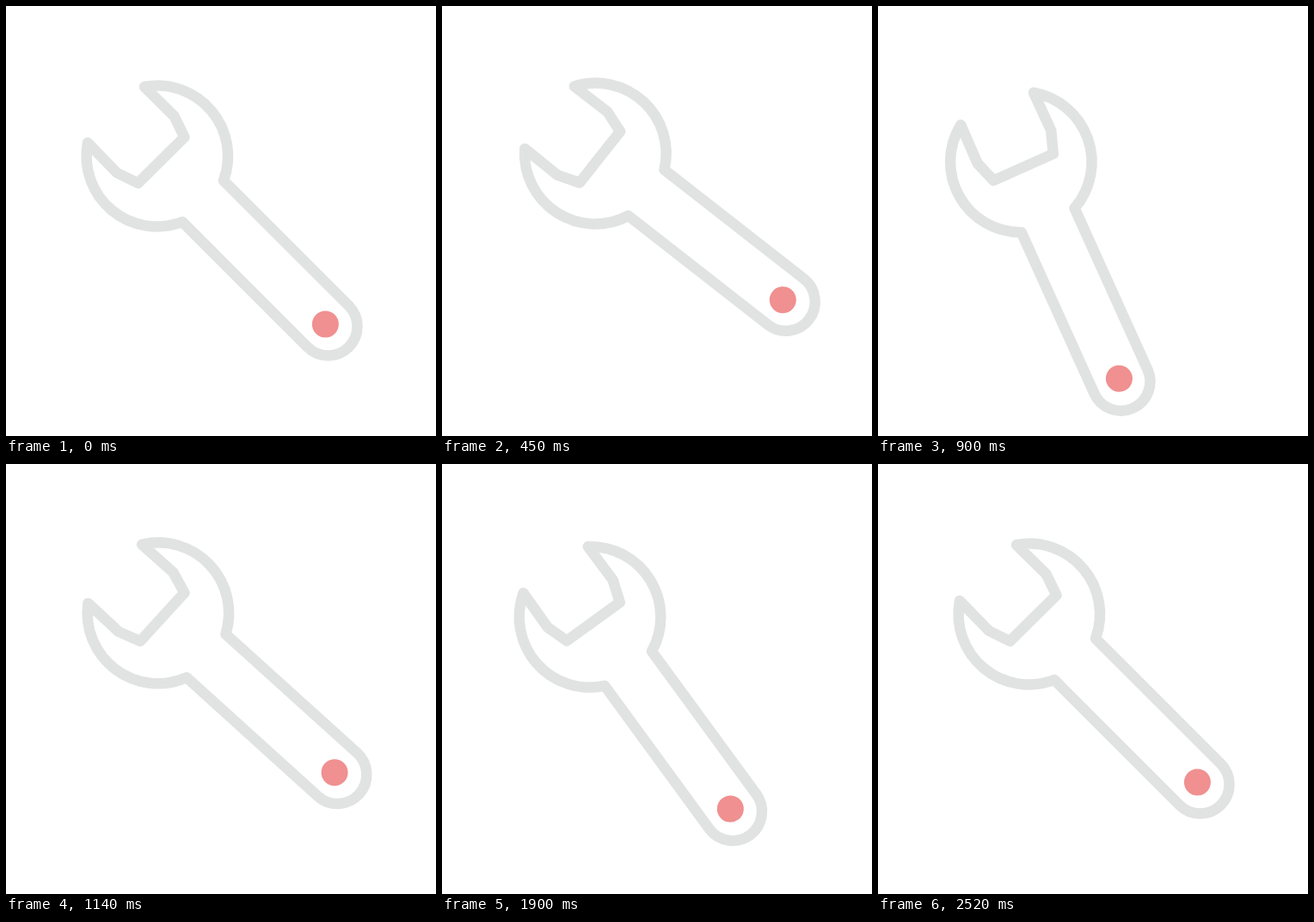
Recreate the animation shown at these times as an HTML page. Size 500 by 500 pixels, loop 2.56 s.

```html
<!DOCTYPE html>
<html lang="en">
<head>
<meta charset="utf-8">
<title>Wrench</title>
<style>
  html, body { margin: 0; width: 100%; height: 100%; overflow: hidden; background: #fff; }
  svg { display: block; width: 100vw; height: 100vh; }
</style>
</head>
<body>
<svg viewBox="0 0 500 500">
  <g id="wrench">
    <path fill="none" stroke="#e1e3e2" stroke-width="12.5" stroke-linecap="round" stroke-linejoin="round"
      d="M161 94 L195.5 128 L207.5 152.5 L153.5 206 L129 194 L95 159
         A82 82 0 0 0 205 251 L350.6 396.6 A33.9 33.9 0 0 0 398.6 348.6
         L253 203 A82 82 0 0 0 161 94 Z"/>
    <circle cx="371.4" cy="370" r="15.5" fill="#f09090"/>
  </g>
</svg>
<script>
const LOOP = 2560, STEPS = 74;
const wrench = document.getElementById('wrench');

// [step, degrees]
const keys = [
  [0, 0], [5.4, 22.1], [9, 8.83], [11, -2.88], [13, -7], [16, -9.5], [17.5, -10.1],
  [23, 3.29], [24, 8.8], [26, 20.66], [27.3, 22.1], [31, 8.83], [33, -2.88], [35, -7], [40, -10.1],
  [47, 3.29], [48, 8.8], [50, 20.3], [51.4, 22.1], [55, 8.83], [57, -2.88], [59, -7.8], [61.7, -10.1],
  [64, -8.6], [73, 0], [74, 0]
];

const rise = i => (keys[i + 1][1] - keys[i][1]) / (keys[i + 1][0] - keys[i][0]);

// Tangents that never overshoot a key
const slopes = keys.map((k, i) => {
  if (i === 0 || i === keys.length - 1) return 0;
  const a = rise(i - 1), b = rise(i);
  return a * b > 0 ? 2 * a * b / (a + b) : 0;
});

function angleAt(s) {
  let i = 0;
  while (i < keys.length - 2 && s >= keys[i + 1][0]) i++;
  const [x0, y0] = keys[i], [x1, y1] = keys[i + 1];
  const h = x1 - x0, u = (s - x0) / h, v = 1 - u;
  return v * v * (1 + 2 * u) * y0 + u * u * (3 - 2 * u) * y1
    + h * u * v * (v * slopes[i] - u * slopes[i + 1]);
}

function draw(now) {
  const t = now % LOOP;
  const step = Math.min(STEPS - 1, Math.floor(t / LOOP * STEPS + 0.2));
  wrench.setAttribute('transform', `rotate(${angleAt(step).toFixed(3)} 152.5 152)`);
}

let start;
function tick(now) {
  start ??= now;
  draw(Math.max(0, now - start));
  requestAnimationFrame(tick);
}
draw(0);
requestAnimationFrame(tick);
</script>
</body>
</html>
```
